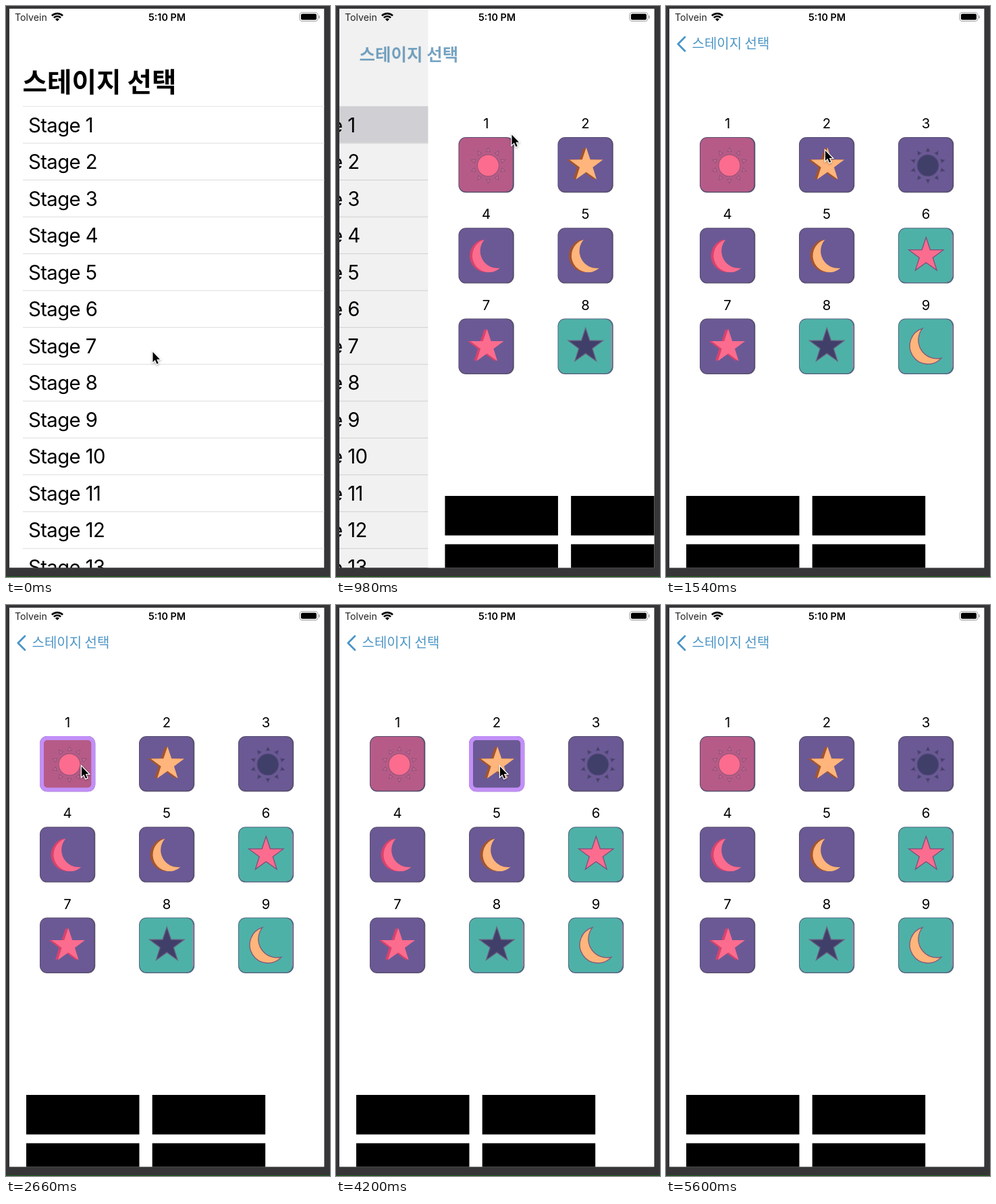
An HTML page with a canvas that plays this animation: 480 by 845 pixels, repeating every 5670 ms.

```html
<!DOCTYPE html>
<html lang="ko">
<head>
<meta charset="utf-8">
<title>스테이지 선택</title>
<style>
html, body { margin: 0; width: 100%; height: 100%; overflow: hidden; background: #363537; }
canvas { display: block; width: 480px; height: 845px; }
</style>
</head>
<body>
<canvas id="stage"></canvas>
<script>
const W = 480, H = 845, LOOP = 5670, STEP = 70;
const SCREEN = { x: 5, y: 4, w: 466.5, h: 827.5 };
const LATIN = 'Inter, "Noto Sans", sans-serif';
const KOREAN = '"Noto Sans CJK KR", "Noto Sans CJK", "Noto Sans KR", sans-serif';
const PURPLE = '#6b5995', TEAL = '#4eb1a7', ROSE = '#b65b87';
const PINK = '#fb6c8e', ORANGE = '#ffb57b', NAVY = '#403f6a';
const PINK_SIDE = '#d8436c', ORANGE_SIDE = '#a2542f';

const canvas = document.getElementById('stage');
const ctx = canvas.getContext('2d');
const dpr = window.devicePixelRatio || 1;
canvas.width = W * dpr;
canvas.height = H * dpr;

const clamp = (v, a = 0, b = 1) => Math.min(b, Math.max(a, v));
const mix = (a, b, k) => a + (b - a) * k;
const ease = k => k * k * (3 - 2 * k);

function text(str, x, y, size, { font = LATIN, weight = 400, color = '#000', align = 'left', track = 0 } = {}) {
  ctx.font = `${weight} ${size}px ${font}`;
  ctx.letterSpacing = track + 'px';
  ctx.textAlign = align;
  ctx.fillStyle = color;
  ctx.fillText(str, x, y);
}

function rect(x, y, w, h, color) {
  ctx.fillStyle = color;
  ctx.fillRect(x, y, w, h);
}

function rounded(x, y, w, h, r) {
  ctx.beginPath();
  ctx.roundRect(x, y, w, h, r);
}

// Shapes, in tile coordinates
function starPath(cx, cy, r) {
  const path = new Path2D();
  for (let i = 0; i < 10; i++) {
    const a = i * Math.PI / 5 - Math.PI / 2, d = i % 2 ? r * 0.39 : r;
    path.lineTo(cx + d * Math.cos(a), cy + d * Math.sin(a));
  }
  path.closePath();
  return path;
}
const STAR = starPath(42.3, 41.5, 26);
const BIG_STAR = starPath(41.3, 41, 27);
const MOON = new Path2D('M38.5 17.5A24.6 24.6 0 1 0 61.5 59.5A25.5 25.5 0 0 1 38.5 17.5Z');
const BIG_MOON = new Path2D('M36 14.5A27 27 0 1 0 64 58.5A27.5 27.5 0 0 1 36 14.5Z');

function drawSun(fill, ray, line) {
  ctx.save();
  ctx.translate(44, 42);
  ctx.strokeStyle = line;
  ctx.lineWidth = 1;
  for (let i = 0; i < 10; i++) {
    ctx.beginPath();
    ctx.moveTo(-3, -20.5);
    ctx.lineTo(0, -26.5);
    ctx.lineTo(3, -20.5);
    ctx.closePath();
    ctx.fillStyle = ray;
    ctx.fill();
    ctx.stroke();
    ctx.rotate(Math.PI / 5);
  }
  ctx.beginPath();
  ctx.arc(0, 0, 16, 0, Math.PI * 2);
  ctx.fillStyle = fill;
  ctx.fill();
  ctx.stroke();
  ctx.restore();
}

function drawRaised(path, fill, side) {
  ctx.fillStyle = side;
  for (let dx = -4; dx < 0; dx++) {
    ctx.save();
    ctx.translate(dx, 0);
    ctx.fill(path);
    ctx.restore();
  }
  ctx.fillStyle = fill;
  ctx.fill(path);
}

function drawOutlined(path, fill, line) {
  ctx.fillStyle = fill;
  ctx.fill(path);
  ctx.strokeStyle = line;
  ctx.lineWidth = 1.3;
  ctx.stroke(path);
}

const TILES = [
  [ROSE, () => drawSun(PINK, '#c6668f', '#8f5378')],
  [PURPLE, () => drawRaised(STAR, ORANGE, ORANGE_SIDE)],
  [PURPLE, () => drawSun(NAVY, '#453f67', '#594f80')],
  [PURPLE, () => drawRaised(MOON, PINK, PINK_SIDE)],
  [PURPLE, () => drawRaised(MOON, ORANGE, ORANGE_SIDE)],
  [TEAL, () => drawOutlined(BIG_STAR, PINK, '#7d4f7c')],
  [PURPLE, () => drawRaised(STAR, PINK, PINK_SIDE)],
  [TEAL, () => drawOutlined(BIG_STAR, NAVY, '#6b6181')],
  [TEAL, () => drawOutlined(BIG_MOON, ORANGE, '#845779')]
];

function drawTile(i, selected) {
  const [color, drawShape] = TILES[i];
  const x = 50 + (i % 3) * 147, y = 194 + Math.floor(i / 3) * 134.3, size = 82.3;
  text(i + 1, x + 41, y - 13, 20.3, { align: 'center' });
  ctx.save();
  ctx.translate(x, y);
  rounded(0, 0, size, size, 11);
  ctx.fillStyle = color === TEAL ? '#586783' : '#59506f';
  ctx.fill();
  rounded(1, 1, size - 3, size - 2.5, 10);
  ctx.fillStyle = color;
  ctx.fill();
  if (color === TEAL) rect(size - 3, 10, 1.3, size - 20, '#a98bab');
  drawShape();
  if (selected) {
    rounded(3, 3, size - 6, size - 6, 8);
    ctx.strokeStyle = '#c28ff7';
    ctx.lineWidth = 6;
    ctx.stroke();
  }
  ctx.restore();
}

function drawList(p, pressed) {
  ctx.save();
  ctx.translate(-0.3 * SCREEN.w * p, 0);
  const pitch = 54.53;
  if (pressed) rect(SCREEN.x, 148.5, SCREEN.w, pitch - 0.5, '#dcdce0');
  for (let i = 0; i < 13; i++) {
    const y = 148 + i * pitch;
    rect(25, y, 447, 1, i ? '#dcdcde' : '#e6e6e8');
    text('Stage ' + (i + 1), 33, y + 38.5, 29.3, { track: -0.6 });
  }
  ctx.restore();
  // The dimming fades again as the list is covered
  rect(SCREEN.x, SCREEN.y, SCREEN.w, SCREEN.h, `rgba(0,0,0,${0.28 * p * (1 - p)})`);
}

function drawBoard(offset, selected) {
  ctx.save();
  ctx.translate(offset, 0);
  rect(SCREEN.x, SCREEN.y, SCREEN.w, SCREEN.h, '#fff');
  for (let i = 0; i < 9; i++) drawTile(i, i === selected);
  for (const y of [725, 796.5]) {
    for (const x of [30, 216.7]) rect(x, y, 167.5, 58.5, '#000');
  }
  ctx.restore();
}

// Large heading shrinks into the back button while changing weight and colour
function drawTitle(p) {
  const label = '스테이지 선택';
  const x = mix(24.5, 38.5, p), size = mix(39.7, 20, p);
  const y = mix(112, 55.5, p) + size * 0.38;
  const tint = [75, 149, 198].map(c => Math.round(c * p));
  ctx.globalAlpha = Math.sqrt(1 - p);
  text(label, x, y, size, { font: KOREAN, weight: 700, color: `rgb(${tint})` });
  ctx.globalAlpha = p * p;
  text(label, x, y, size, { font: KOREAN, color: '#4b95c6' });
  ctx.globalAlpha = clamp((p - 0.75) / 0.2);
  ctx.strokeStyle = '#4b95c6';
  ctx.lineWidth = 2.8;
  ctx.lineCap = ctx.lineJoin = 'round';
  ctx.stroke(new Path2D('M28 46L17.8 56.2L28 66.4'));
  ctx.globalAlpha = 1;
}

function drawStatus() {
  text('Tolvein', 13, 21.5, 14.2, { color: '#222' });
  text('5:10 PM', 238.5, 21.5, 14.4, { weight: 600, align: 'center' });
  ctx.save();
  ctx.strokeStyle = ctx.fillStyle = '#000';
  ctx.lineCap = 'butt';
  ctx.lineWidth = 2.6;
  const from = -Math.PI * 0.75, to = -Math.PI * 0.25;
  for (const r of [11.4, 7.2]) {
    ctx.beginPath();
    ctx.arc(76, 22.5, r, from, to);
    ctx.stroke();
  }
  ctx.beginPath();
  ctx.moveTo(76, 22.5);
  ctx.arc(76, 22.5, 4.2, from, to);
  ctx.fill();
  rounded(435, 9.5, 27, 13, 4);
  ctx.strokeStyle = '#a5a5a5';
  ctx.lineWidth = 1.1;
  ctx.stroke();
  rounded(437, 11.5, 23, 9, 2);
  ctx.fill();
  rounded(463.3, 14, 1.5, 4.5, 1);
  ctx.fillStyle = '#a5a5a5';
  ctx.fill();
  ctx.restore();
}

// Pointer stops: time, x, y
const POINTER = [
  [140, 217.5, 512], [700, 260.5, 190.5], [1260, 260.5, 190.5], [1540, 236, 214],
  [1890, 236, 214], [2380, 112, 239], [3150, 112, 239], [3780, 243, 239],
  [4760, 243, 239], [5530, 300, 870]
];
const ARROW = new Path2D('M0 0V15L3.4 11.8L6 17.8L8.3 16.8L5.8 10.9H10.5Z');

function pointerAt(t) {
  const next = POINTER.findIndex(s => s[0] > t);
  if (next === 0) return POINTER[0].slice(1);
  if (next < 0) return POINTER.at(-1).slice(1);
  const [t0, x0, y0] = POINTER[next - 1], [t1, x1, y1] = POINTER[next];
  const k = ease((t - t0) / (t1 - t0));
  return [mix(x0, x1, k), mix(y0, y1, k)];
}

function drawPointer(t) {
  ctx.save();
  ctx.translate(...pointerAt(t));
  ctx.lineJoin = 'miter';
  ctx.shadowColor = 'rgba(0,0,0,.35)';
  ctx.shadowBlur = 3 * dpr;
  ctx.shadowOffsetY = dpr;
  ctx.strokeStyle = '#fff';
  ctx.lineWidth = 2.4;
  ctx.stroke(ARROW);
  ctx.shadowColor = 'transparent';
  ctx.fillStyle = '#000';
  ctx.fill(ARROW);
  ctx.restore();
}

function selectedAt(t) {
  if (t >= 2450 && t < 3150) return 0;
  if (t >= 3850 && t < 4690) return 1;
  return -1;
}

// Critically damped spring
function pushAt(t) {
  const u = Math.max(0, t - 818) * 0.0156;
  const p = 1 - (1 + u) * Math.exp(-u);
  return p > 0.998 ? 1 : p;
}

function draw(t) {
  const p = pushAt(t);
  ctx.setTransform(dpr, 0, 0, dpr, 0, 0);
  rect(0, 0, W, H, '#363537');
  rect(0, 844, W, 1, '#1b5f1b');
  ctx.save();
  ctx.beginPath();
  ctx.rect(SCREEN.x, SCREEN.y, SCREEN.w, SCREEN.h);
  ctx.clip();
  rect(SCREEN.x, SCREEN.y, SCREEN.w, SCREEN.h, '#fff');
  if (p < 1) drawList(p, t >= 770);
  if (p > 0) drawBoard(SCREEN.w * (1 - p), selectedAt(t));
  drawTitle(p);
  drawStatus();
  ctx.restore();
  drawPointer(t);
}

const start = performance.now();
function tick() {
  const t = Math.max(0, performance.now() - start) % LOOP;
  draw(Math.floor(t / STEP) * STEP);
  requestAnimationFrame(tick);
}
tick();
</script>
</body>
</html>
```
